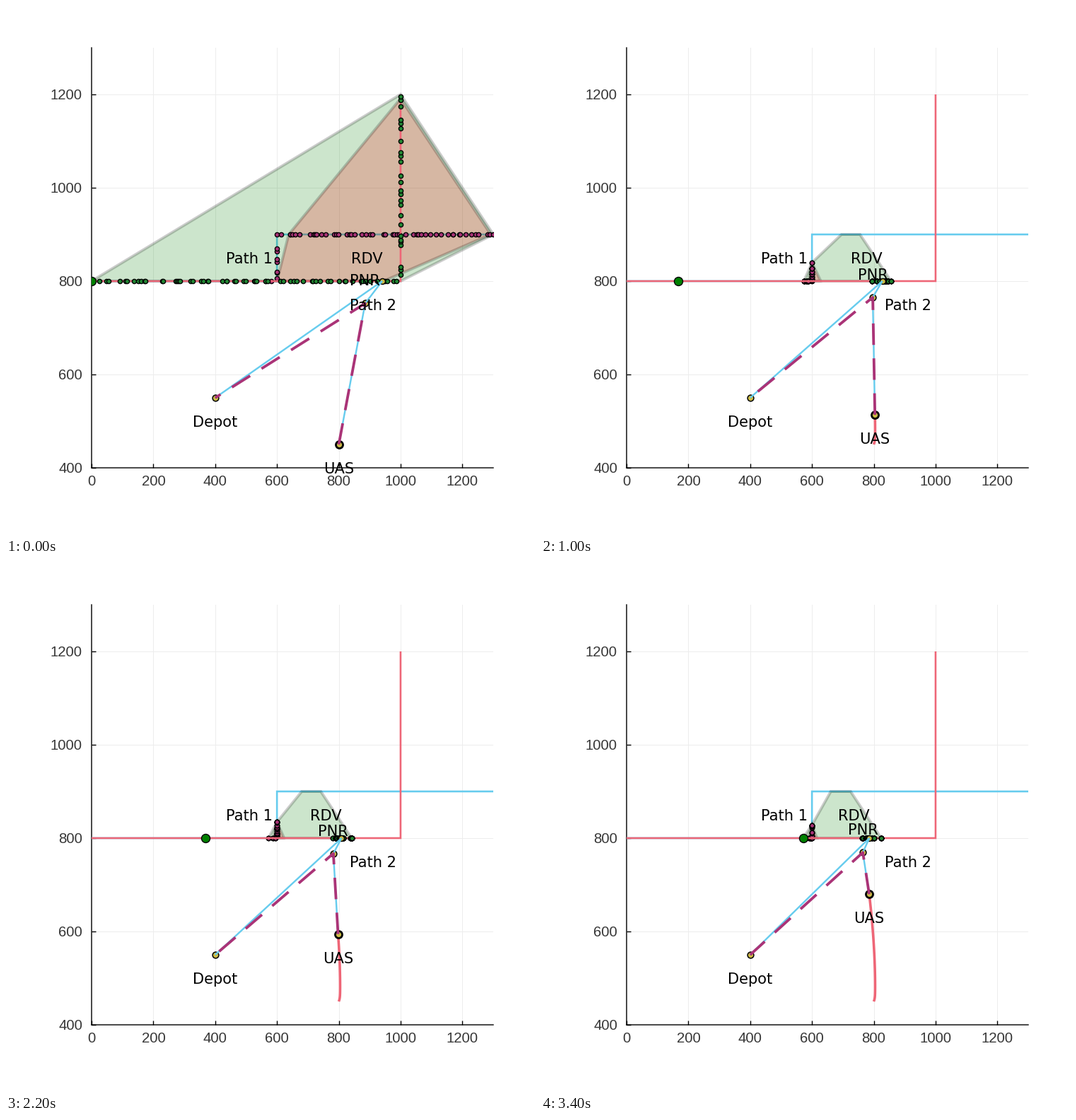
Recreate the animation shown at these times as a matplotlib script. Size 748 by 748 pixels, loop 3470 ms.

```python
import numpy as np
import matplotlib.pyplot as plt
from matplotlib.animation import FuncAnimation

SIZE, DPI = 748, 100
PX = 72 / DPI  # points per pixel
LOOP_MS, TICKS = 3470, 174
FPS, STEPS = 15, 52  # the scene itself advances at this rate

RED, CYAN, PURPLE = "#EE6677", "#66CCEE", "#AA3377"
LEAF, YELLOW = "#228833", "#CCBB44"

PATH_1 = np.array([(0, 800), (600, 800), (600, 900), (1400, 900)])
PATH_2 = np.array([(0, 800), (1000, 800), (1000, 1200)])
DEPOT = (400, 550)

# Hulls of the starting uncertainty
WIDE_GREEN = [(0, 800), (600, 1040), (1000, 1200), (1300, 900), (1000, 800)]
WIDE_RED = [(600, 800), (638, 900), (1000, 1191), (1292, 900), (945, 800)]


def scatter(lo, hi, count, seed):
    """Jittered distances along a path, in order."""
    jitter = np.random.default_rng(seed).normal(0, 12, count)
    return np.sort(np.clip(np.linspace(lo, hi, count) + jitter, 0, hi))


START_1 = scatter(570, 1400, 60, 4)
START_2 = scatter(35, 1400, 85, 9)


def progress(i):
    return np.clip((i - 7) / (STEPS - 8), 0, 1)


def drift(i, a, b):
    return a + (b - a) * progress(i) ** 1.3


def mix(wide, narrow, i):
    """Starting uncertainty collapsing onto the tracked estimate."""
    w = np.exp(-0.9 * i)
    return w * np.asarray(wide) + (1 - w) * np.asarray(narrow)


def along(path, dist):
    steps = np.hypot(*np.diff(path, axis=0).T)
    s = np.concatenate([[0], np.cumsum(steps)])
    return np.interp(dist, s, path[:, 0]), np.interp(dist, s, path[:, 1])


def uas_at(i):
    x = 804.4 - 4.4 * np.exp(-i / 1.5) - 19.2 * progress(i) ** 2
    y = 450 + 4.13 * i + 0.0074 * i ** 2
    return x, y


def rdv_at(i):
    return mix(940.4, drift(i, 832.7, 785.7), i), 800


def pnr_at(i):
    return mix((885.4, 752.3), (drift(i, 800.6, 764.6), drift(i, 764.7, 769.2)), i)


def bounds(i):
    return drift(i, 574, 571), drift(i, 841, 828), drift(i, 860, 824)


def hulls(i):
    left, top, right = bounds(i)
    foot = drift(i, 630, 616)
    green = [(left, 800), (600, top), (drift(i, 700, 661), 900),
             (drift(i, 759, 725), 900), (right, 800)]
    red = [(588, 800), (600, top), (600, top), (foot, 800), (foot, 800)]
    return mix(WIDE_GREEN, green, i), mix(WIDE_RED, red, i)


def resample(start, lo, hi, count, rng, i):
    """Pull the starting particles onto a few values from lo to hi."""
    seats = np.concatenate([[0, 1], rng.random(count)])
    narrow = np.sort(lo + (hi - lo) * rng.choice(seats, len(start)))
    return mix(start, narrow, i)


fig = plt.figure(figsize=(SIZE / DPI, SIZE / DPI), dpi=DPI, facecolor="white")
ax = fig.add_axes([121 / SIZE, 95 / SIZE, 568 / SIZE, 594 / SIZE])
ax.set(xlim=(0, 1300), ylim=(400, 1300),
       xticks=range(0, 1201, 200), yticks=range(400, 1201, 200))
ax.set_axisbelow(True)
ax.grid(color="#EDEDED", lw=1 * PX)
ax.tick_params(direction="in", length=6 * PX, width=1.4 * PX)
ax.tick_params(axis="x", pad=10.5 * PX)
ax.tick_params(axis="y", pad=13 * PX)
for side, spine in ax.spines.items():
    spine.set_visible(side in ("left", "bottom"))
    spine.set_linewidth(1.4 * PX)
    spine.set_snap(False)
for label in ax.get_xticklabels() + ax.get_yticklabels():
    label.set(fontfamily="Liberation Sans", fontsize=20.4 * PX, color="#383838")


def line(color, width, z, pts=((), ()), **kw):
    return ax.plot(*pts, color=color, lw=width * PX, zorder=z, snap=False,
                   solid_capstyle="butt", solid_joinstyle="miter", **kw)[0]


def dots(color, size, edge, z):
    return ax.plot([], [], "o", ms=size * PX, mfc=color, mec="black",
                   mew=edge * PX, zorder=z, snap=False)[0]


def hull(color, z):
    corner = [0, 0, 0], [800, 800, 800]
    fill = ax.fill(*corner, color=color, alpha=0.2, lw=0, zorder=z)[0]
    rim = ax.fill(*corner, fill=False, ec=(0, 0, 0, 0.2), lw=4 * PX,
                  zorder=z + 0.1)[0]
    return fill, rim


def text(x, y, label):
    return ax.text(x, y - 12, label, ha="center", va="baseline", zorder=20,
                   fontfamily="DejaVu Sans", fontsize=21 * PX)


line(CYAN, 2.6, 3, PATH_1.T)
green_hull = hull("green", 4)
red_hull = hull("red", 4.5)
dots_1 = dots(PURPLE, 6.2, 1.4, 5)
line(RED, 2.6, 6, PATH_2.T)
dots_2 = dots(LEAF, 6.2, 1.4, 7)
truck = dots("green", 12, 1.4, 8)
trail = line(RED, 3.6, 9)
depot = dots(YELLOW, 8.8, 1.5, 10)
pnr = dots(YELLOW, 8.8, 1.5, 10)
rdv = dots(YELLOW, 8, 1.5, 10)
uas = dots(YELLOW, 10, 2.8, 11)
home_leg = line(CYAN, 2.4, 12)
meet_leg = line(CYAN, 2.4, 12)
abort = line(PURPLE, 3.8, 13, dash_capstyle="butt")
abort.set_linestyle((0, (8, 5)))

depot.set_data([DEPOT[0]], [DEPOT[1]])
text(510, 850, "Path 1")
text(910, 750, "Path 2")
text(DEPOT[0], DEPOT[1] - 50, "Depot")
rdv_text = text(0, 800, "RDV")
pnr_text = text(0, 800, "PNR")
uas_text = text(0, 800, "UAS")


def join(artist, *points):
    artist.set_data(*zip(*points))


def draw(tick):
    # latest step that begins before this tick ends
    end = (tick + 1) * LOOP_MS / TICKS
    i = min(STEPS - 1, int(end * FPS / 1000))
    rng = np.random.default_rng(100 + i)
    u, p, r = uas_at(i), pnr_at(i), rdv_at(i)
    left, top, right = bounds(i)

    for pair, shape in zip((green_hull, red_hull), hulls(i)):
        for patch in pair:
            patch.set_xy(shape)

    dots_1.set_data(*along(PATH_1, resample(START_1, left, top - 200, 14, rng, i)))
    dots_2.set_data(*along(PATH_2, resample(START_2, right - 62, right, 9, rng, i)))

    join(truck, (11.2 * i, 800))
    join(uas, u)
    join(pnr, p)
    join(rdv, r)
    trail.set_data(*uas_at(np.arange(i + 1)))
    join(home_leg, DEPOT, r)
    join(meet_leg, u, p, r)
    join(abort, u, p, DEPOT)

    rdv_text.set_position((r[0] - 50, r[1] + 38))
    pnr_text.set_position((p[0], p[1] + 38))
    uas_text.set_position((u[0], u[1] - 62))
    return []


anim = FuncAnimation(fig, draw, frames=TICKS, interval=LOOP_MS / TICKS,
                     init_func=lambda: draw(0), repeat=True, repeat_delay=0)
plt.show()
```
